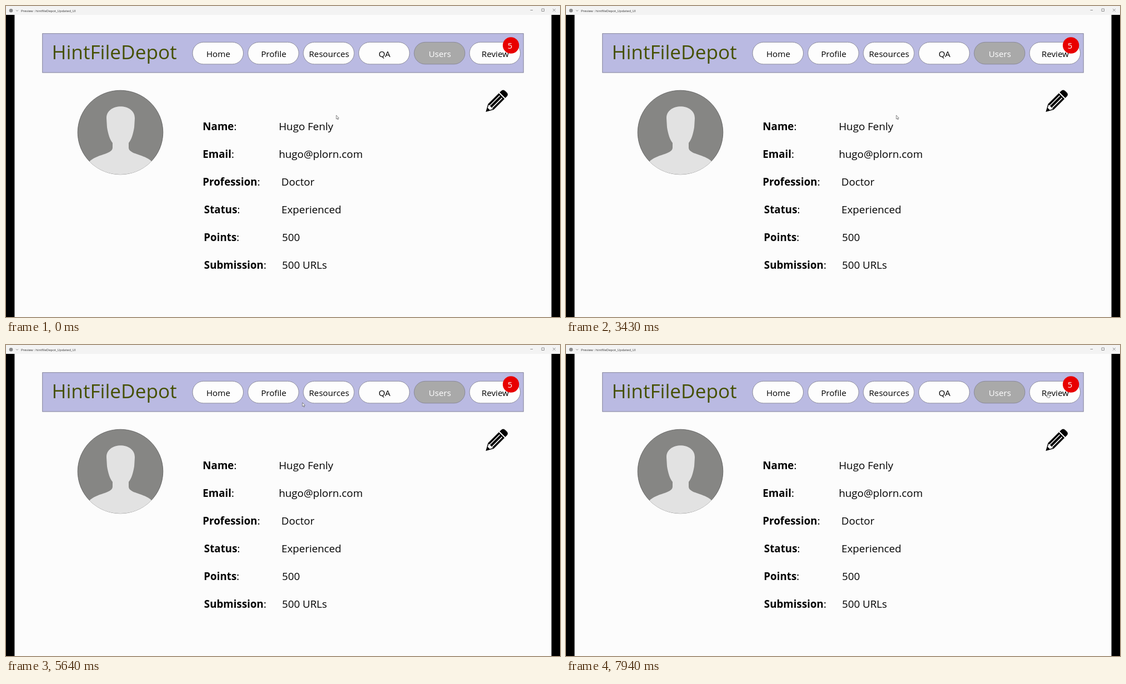
Recreate the animation shown at these times as an HTML page. Size 998 by 561 pixels, loop 8000 ms.

```html
<!DOCTYPE html>
<html lang="en">
<head>
<meta charset="utf-8">
<title>Profile preview</title>
<style>
  html, body { margin: 0; width: 100%; height: 100%; overflow: hidden; background: #fcfcfc; }
  svg { display: block; width: 998px; height: 561px; font-family: "Open Sans", "Noto Sans", sans-serif; }
  text { white-space: pre; }
  .label { font-weight: 700; }
  .label tspan { font-weight: 400; }
  .thin { fill: none; stroke: #777; stroke-width: .8; }
</style>
</head>
<body>
<svg viewBox="0 0 998 561">
  <!-- window frame -->
  <path d="M0 16H15.4V561H0zM982.6 16H998V561H982.6z"/>
  <rect width="998" height="16" fill="#f3f3f3"/>
  <circle cx="9" cy="8.2" r="3.3" fill="#8a8a8a"/>
  <path class="thin" d="M18 7.3l2 2 2-2M944.5 7.5h4.5M965 5h4.5v4.5h-4.5zM985 5l4.8 4.8M989.8 5l-4.8 4.8"/>
  <text x="27" y="10.6" font-size="6" fill="#333">Preview : hintfileDepot_Updated_UI</text>

  <!-- header -->
  <rect x="65.7" y="49.7" width="866.5" height="70.4" fill="#babae2" stroke="#85859c"/>
  <text x="82.5" y="96" font-size="35.2" fill="#455000">HintFileDepot</text>
  <g id="nav" font-size="15.2" text-anchor="middle"></g>
  <circle cx="909.6" cy="71" r="14.7" fill="#e80000"/>
  <text x="908" y="77" font-size="14.5" fill="#fff" text-anchor="middle">5</text>

  <!-- avatar -->
  <clipPath id="disc"><ellipse cx="206" cy="228" rx="77" ry="76"/></clipPath>
  <ellipse cx="206" cy="228" rx="76.8" ry="75.8" fill="#868684" stroke="#555" stroke-width=".8"/>
  <path clip-path="url(#disc)" fill="#e2e2e2" d="M181 203C180 174 233 174 232 203
    L231 219C229 231 226 241 221 247L221 256C222 268 250 267 263 281L275 310H137L150 281
    C163 267 191 268 192 256L192 247C187 241 184 231 182 219Z"/>

  <!-- pencil -->
  <g transform="translate(864.3 191) rotate(-45)">
    <path d="M0 0L13-7.2H40.5V7.2H13zM42.5-7.2H46Q51.5-7.2 51.5-2V2Q51.5 7.2 46 7.2H42.5z"/>
    <path d="M7.5-2.6L13-5.4V5.4L7.5 2.6z" fill="#fcfcfc"/>
    <path d="M13-2.9H38.5M13 2.9H38.5" stroke="#fcfcfc" stroke-width="1.6"/>
  </g>

  <g id="details" font-size="18.8"></g>

  <g id="cursor" stroke="#555" stroke-width=".7" fill="#fff" stroke-linejoin="round">
    <path id="arrow" d="M0 0V7L1.6 5.6 2.7 8 3.7 7.5 2.7 5.2H4.7z"/>
    <path id="hand" d="M-.8 4.6V.6Q0-.5.7.6V3L3.2 3.5Q4 3.8 3.8 5L3.2 8H-.5L-3 5.2Q-2.5 4-.8 5.5z"/>
  </g>
</svg>
<script>
const $ = id => document.getElementById(id);

const buttons = ["Home", "Profile", "Resources", "QA", "Users", "Review"]
  .map((name, i) => ({ name, x: 336 + i * 99.8 }));

$("nav").innerHTML = buttons.map(({ name, x }) => {
  const active = name === "Users";
  return `<rect x="${x}" y="65.3" width="91.6" height="39.6" rx="19.8"
      fill="${active ? "#a9a9a9" : "#fdfdfd"}" stroke="#858595" stroke-width=".9"/>
    <text x="${x + 46.4}" y="91.7" fill="${active ? "#fff" : "#000"}">${name}</text>`;
}).join("");

$("details").innerHTML = [
  ["Name", 354.3, "Hugo Fenly", 491.5],
  ["Email", 354.3, "hugo@plorn.com", 491.5],
  ["Profession", 354.3, "Doctor", 496],
  ["Status", 356.8, "Experienced", 496.3],
  ["Points", 356.3, "500", 497.2],
  ["Submission", 356.8, "500 URLs", 497.2],
].map(([label, x, value, valueX], i) => {
  const y = 224 + i * 50;
  return `<text class="label" x="${x}" y="${y}">${label}<tspan>:</tspan></text>
    <text x="${valueX}" y="${y}">${value}</text>`;
}).join("");

// Pointer stops: time in ms, x, y
const stops = [
  [0, 595, 197], [3650, 595, 197], [4450, 274, 153], [4570, 274, 153],
  [5240, 463, 113], [6200, 651, 89], [7000, 765, 88], [7840, 868, 87], [8000, 868, 87],
];

function pointerAt(t) {
  const i = stops.findIndex(s => s[0] > t);
  const [t0, x0, y0] = stops[i - 1], [t1, x1, y1] = stops[i];
  const p = (t - t0) / (t1 - t0), k = p * p * (3 - 2 * p);
  return [x0 + (x1 - x0) * k, y0 + (y1 - y0) * k];
}

function draw(now) {
  const [x, y] = pointerAt(now % 8000);
  const over = y > 65 && y < 105 && buttons.some(b => x > b.x && x < b.x + 91.6);
  $("cursor").setAttribute("transform", `translate(${x} ${y})`);
  $("hand").style.display = over ? "" : "none";
  $("arrow").style.display = over ? "none" : "";
  requestAnimationFrame(draw);
}
requestAnimationFrame(draw);
</script>
</body>
</html>
```
